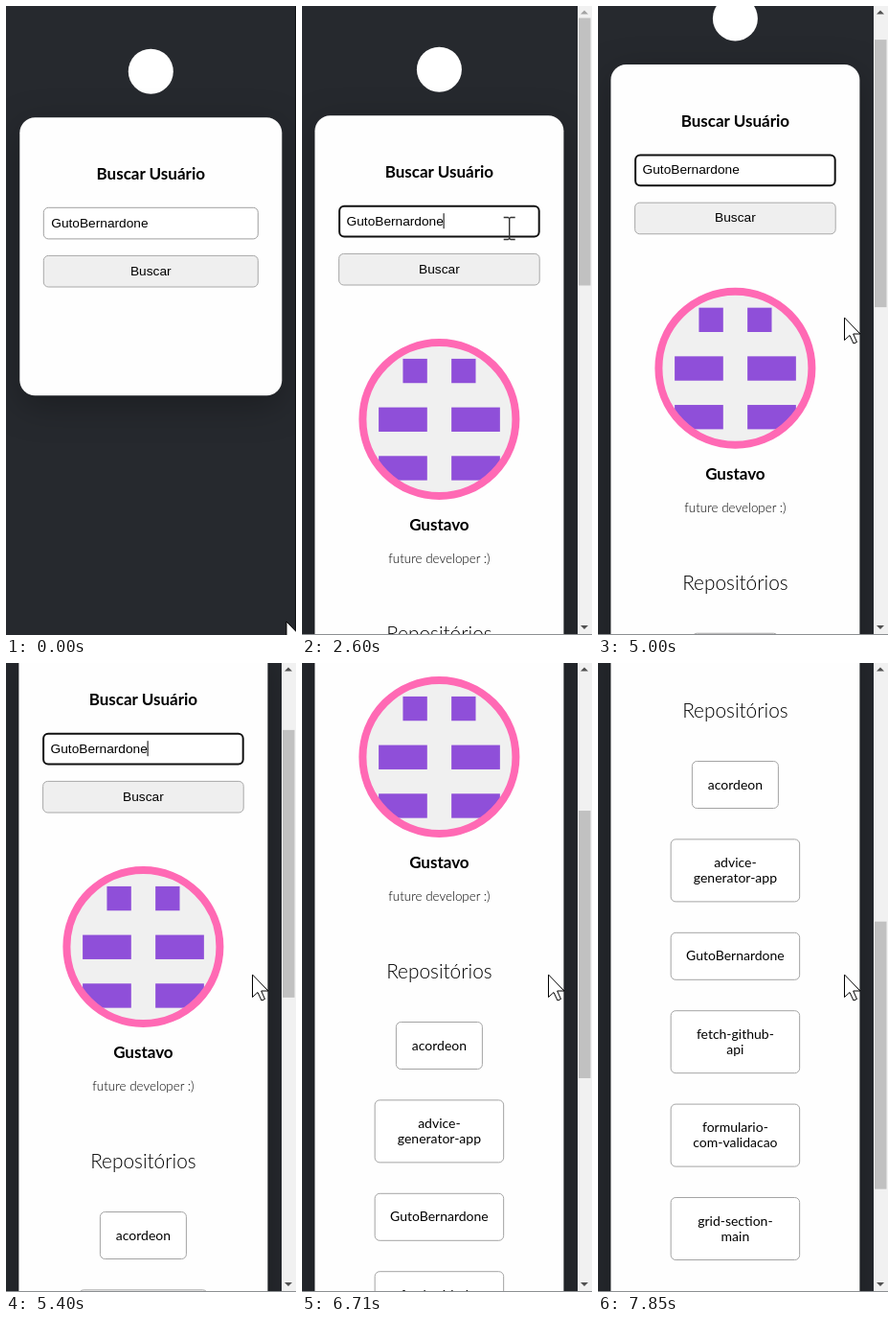
An HTML page that plays this animation: 303x656 px, repeating every 8 s.

```html
<!DOCTYPE html>
<html lang="pt">
<head>
<meta charset="utf-8">
<style>
html, body { margin: 0; width: 100%; height: 100%; overflow: hidden; background: #26292e; }
svg { display: block; }
text { font-family: Lato, "Open Sans", sans-serif; fill: #000; }
.ui { font-family: "Liberation Sans", Arial, sans-serif; font-size: 13.7px; }
.mid { text-anchor: middle; }
.bold { font-weight: 700; font-size: 17px; }
.thin { font-weight: 300; }
.card { filter: drop-shadow(0 10px 18px rgba(0, 0, 0, .28)); }
</style>
</head>
<body>
<svg id="stage" width="303" height="656" viewBox="0 0 303 656"></svg>
<script>
const LOOP = 8000, RESULT_AT = 2600;
const PINK = '#ff69b4', USER = 'GutoBernardone';
const FIELD_H = 33.6, INPUT_Y = 93.6, BUTTON_Y = 143.7;
const stage = document.getElementById('stage');

function el(parent, tag, attrs, text) {
  const node = document.createElementNS('http://www.w3.org/2000/svg', tag);
  for (const k in attrs) node.setAttribute(k, attrs[k]);
  if (text) node.textContent = text;
  parent.appendChild(node);
  return node;
}
const rect = (p, x, y, width, height, more) => el(p, 'rect', { x, y, width, height, ...more });
const label = (p, x, y, s, cls, size) =>
  el(p, 'text', { x, y, class: cls, ...(size && { style: `font-size:${size}px` }) }, s);
const show = (node, on) => node.setAttribute('visibility', on ? 'inherit' : 'hidden');
const move = (node, x, y) => node.setAttribute('transform', `translate(${x} ${y})`);

// Logo disc, card and search form; y is the top of the card
function form(cx, y, cardW, cardH, fieldW) {
  const g = el(stage, 'g', {});
  const left = cx - fieldW / 2;
  el(g, 'circle', { cx, cy: y - 48, r: 23.5, fill: '#fff' });
  rect(g, cx - cardW / 2, y, cardW, cardH, { rx: 16, fill: '#fefefe', class: 'card' });
  label(g, cx, y + 65, 'Buscar Usuário', 'mid bold');
  const input = rect(g, 0, 0, 0, 0, { rx: 5 });
  label(g, left + 8.5, y + 114.5, USER, 'ui');
  const caret = rect(g, left + 109.5, y + 102, 1, 16, { fill: '#000' });
  const button = rect(g, 0, 0, 0, 0, { rx: 5 });
  const caption = label(g, cx, y + 164.5, 'Buscar', 'ui mid');
  return { g, left, y, fieldW, input, caret, button, caption };
}

function profile(g, cx) {
  const cy = 431, cell = 25.35, x0 = 80.1, y0 = 367.9;
  const clip = el(el(g, 'clipPath', { id: 'round' }), 'circle', { cx, cy, r: 77 });
  el(g, 'circle', { cx, cy, r: 80, fill: '#f0f0f0' });
  const art = el(g, 'g', { 'clip-path': 'url(#round)', fill: '#8f4fd9' });
  [[1, 0, 1], [3, 0, 1], [0, 2, 2], [3, 2, 2], [0, 4, 2], [3, 4, 2]].forEach(([c, r, n]) =>
    rect(art, x0 + c * cell, y0 + r * cell, n * cell, cell));
  el(g, 'circle', { cx, cy, r: 80, fill: 'none', stroke: PINK, 'stroke-width': 8 });
  label(g, cx, 547, 'Gustavo', 'mid bold');
  label(g, cx, 581, 'future developer :)', 'mid thin', 13.4);
  label(g, cx, 662, 'Repositórios', 'mid thin', 20.8);

  let y = 707.5;
  [['acordeon'], ['advice-', 'generator-app'], [USER], ['fetch-github-', 'api'],
    ['formulario-', 'com-validacao'], ['grid-section-', 'main']].forEach((lines, i) => {
    const w = i ? 134.5 : 90, h = lines.length > 1 ? 65 : 49;
    rect(g, cx - w / 2, y, w, h, { rx: 5, fill: '#fff', stroke: '#a4a4a4' });
    lines.forEach((s, n) => label(g, cx, y + 29 + n * 16.3, s, 'mid', 14));
    y += h + 32.4;
  });
}

const home = form(151.3, 116.2, 274, 290, 225);
rect(home.g, 302, 0, 1, 656, { fill: '#0c0e10' });
const result = form(143.4, 114.2, 260, 1500, 210.6);
profile(result.g, 143.4);

const bar = el(stage, 'g', {});
rect(bar, 288, 0, 15, 656, { fill: '#f1f1f1' });
const thumb = rect(bar, 289, 12.5, 12.5, 279, { fill: '#c1c1c1' });
const up = el(bar, 'path', { d: 'M291 8.5L295 4.5L299 8.5Z' });
el(bar, 'path', { d: 'M291 646L295 650L299 646Z', fill: '#505050' });
rect(bar, 0, 655, 303, 1, { fill: '#8c8f92' });

const glow = el(stage, 'circle', { cx: 214.3, cy: 231, r: 18, fill: '#ff0', 'fill-opacity': .55 });
const line = { fill: '#fff', stroke: '#000', 'stroke-width': 1, 'stroke-linejoin': 'round' };
const cursors = {
  arrow: el(stage, 'path', { ...line, d: 'M0 0V23.5L5.5 18.5L9.5 27L13 25.5L9.2 17H16.5Z' }),
  beam: el(stage, 'path', {
    d: 'M-6 -11.5H-1.5L0 -10.5L1.5 -11.5H6M0 -10.5V10.5M-6 11.5H-1.5L0 10.5L1.5 11.5H6',
    fill: 'none', stroke: '#333', 'stroke-width': 1.4
  }),
  hand: el(stage, 'path', {
    ...line, stroke: '#222',
    d: 'M-2 17V2a2.3 2.3 0 0 1 4.6 0V12.5a2.1 2.1 0 0 1 4.2 0v1a2 2 0 0 1 4 0v1' +
      'a1.9 1.9 0 0 1 3.8 0V21c0 4-1 5-2 7v3H0v-2c-2-3-5-6-7-9c-2-2.5-3-4-2-5.5c1.5-1.5 4 0 7 2.5z' +
      'M2.6 12v4M6.8 13v4M10.8 14v3'
  })
};

const SCROLL = [[4600, 0], [4800, 20], [5000, 53], [5200, 103], [5400, 135],
  [6020, 135], [6220, 189], [6560, 305], [6710, 333],
  [7310, 333], [7450, 383], [7700, 556], [7850, 605]];
const POINTER = [[70, 293, 642], [400, 262, 480], [600, 232, 320], [700, 220, 262], [780, 216.7, 232],
  [3660, 216.7, 232], [3860, 232, 288], [4070, 257.5, 325]];
const BLINKS = [1120, 1650, 2180, 2730, 3190, 3720, 4340, 4800, 5330, 5880, 6410];

// Linear interpolation of column c over [time, ...values] keys
function at(keys, t, c = 1) {
  const i = keys.findIndex(k => k[0] > t);
  if (i < 0) return keys[keys.length - 1][c];
  if (i === 0) return keys[0][c];
  const a = keys[i - 1], b = keys[i];
  return a[c] + (b[c] - a[c]) * (t - a[0]) / (b[0] - a[0]);
}

// Box whose border of width w lies inside its outer edge
function paint(node, page, top, fill, stroke, w) {
  const box = {
    x: page.left + w / 2, y: page.y + top + w / 2,
    width: page.fieldW - w, height: FIELD_H - w, fill, stroke, 'stroke-width': w
  };
  for (const k in box) node.setAttribute(k, box[k]);
}

function draw(t) {
  const found = t >= RESULT_AT;
  const page = found ? result : home;
  const scroll = at(SCROLL, t);
  const x = at(POINTER, t, 1), y = at(POINTER, t, 2);
  const inside = top => x > page.left && x < page.left + page.fieldW &&
    y + scroll > page.y + top && y + scroll < page.y + top + FIELD_H;

  show(home.g, !found);
  show(result.g, found);
  show(bar, found);
  move(result.g, 0, -scroll);
  thumb.setAttribute('y', 12.5 + scroll * .425);
  up.setAttribute('fill', scroll > 0 ? '#505050' : '#a3a3a3');

  const focus = t >= 1120, hover = inside(BUTTON_Y);
  paint(page.input, page, INPUT_Y, '#fff', focus ? '#101010' : '#a0a0a0', focus ? 2 : 1);
  paint(page.button, page, BUTTON_Y, hover ? PINK : '#efefef', hover ? 'none' : '#a8a8a8', 1);
  page.caption.style.fill = hover ? '#fff' : '#000';
  show(page.caret, BLINKS.filter(b => b <= t).length % 2);

  show(glow, t >= 1050 && t < 1320);
  const waiting = t >= 2050 && !found;
  const kind = hover ? 'hand' : inside(INPUT_Y) && !waiting ? 'beam' : 'arrow';
  for (const k in cursors) show(cursors[k], k === kind);
  move(cursors[kind], waiting ? x - 1 : x, waiting ? y - 1 : y);
}

const start = performance.now();
function tick(now) {
  draw(Math.max(0, now - start) % LOOP);
  requestAnimationFrame(tick);
}
draw(0);
requestAnimationFrame(tick);
</script>
</body>
</html>
```
